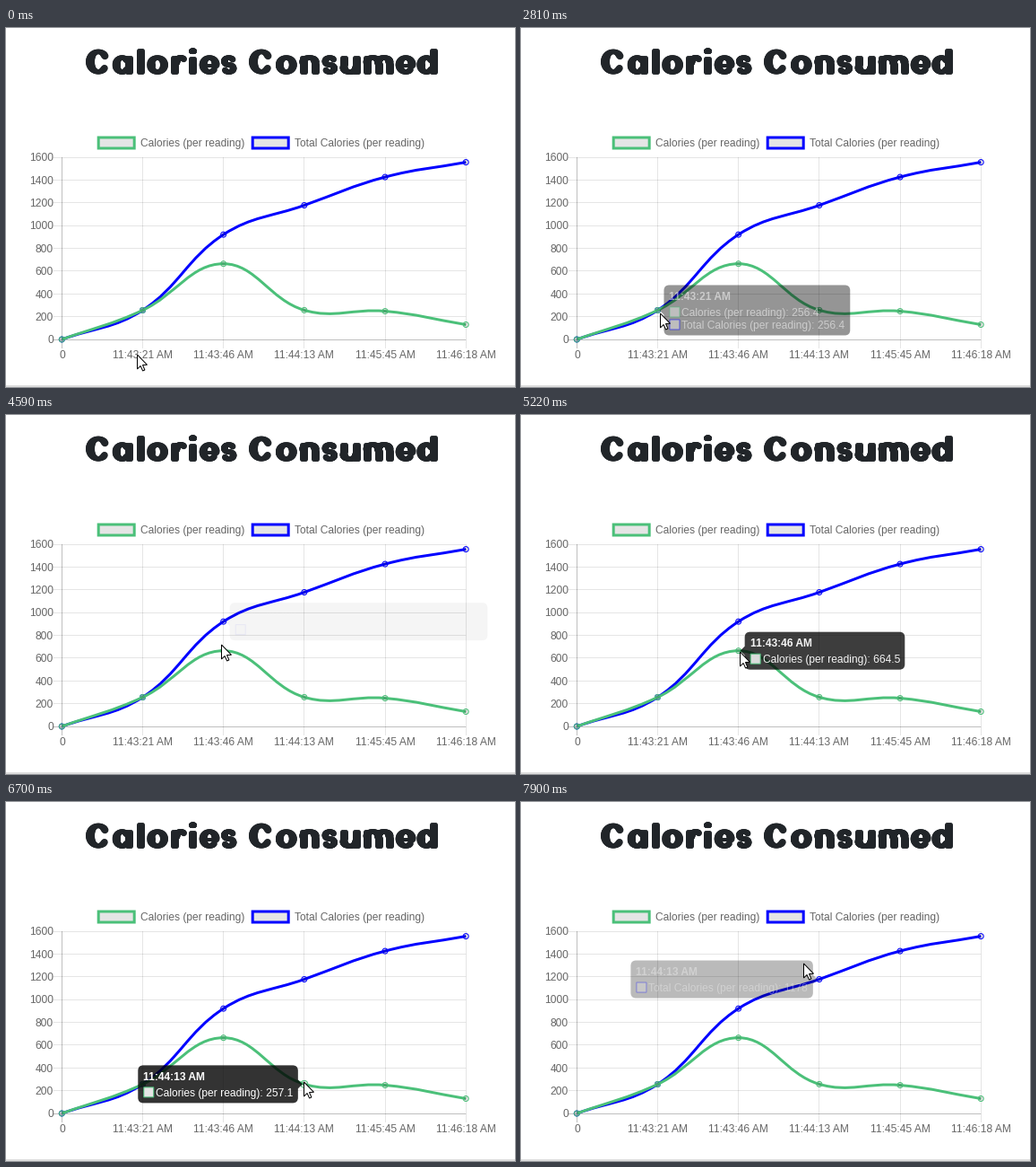
A matplotlib script that plays this animation: 568 by 400 pixels, repeating every 8000 ms.

```python
import numpy as np
import matplotlib.pyplot as plt
from matplotlib.animation import FuncAnimation
from matplotlib.collections import LineCollection
from matplotlib.patches import Circle, PathPatch, Polygon, Rectangle
from matplotlib.path import Path
from matplotlib.textpath import TextPath

W, H, DPI = 568, 400, 100
LOOP, STEP = 8000, 40
PX = 72 / DPI
INK, GRAY, GREEN, BLUE = "#212529", "#666666", "#4bc079", "#0000ff"

plt.rcParams["font.family"] = "Liberation Sans"
plt.rcParams["font.size"] = 12 * PX

fig = plt.figure(figsize=(W / DPI, H / DPI), dpi=DPI, facecolor="white")
ax = fig.add_axes([0, 0, 1, 1])
ax.set_xlim(0, W)
ax.set_ylim(H, 0)
ax.axis("off")


def label(x, y, s, **kw):
    """Text whose capitals are centred on y."""
    return ax.text(x, y + 4.3, s, va="baseline", **kw)


# ---- heading: letters built from pen arcs and stems, y up from the baseline
XH, ASC, THICK, THIN = 21.5, 29, 9, 5.5


def line(x0, y0, x1, y1, w):
    return [np.array([(x0, y0, w), (x1, y1, w)])]


def arc(cx, a0, a1, rx=7.5, cy=XH / 2, ry=8, thick=THICK):
    """Elliptic stroke, heavy at the sides and light at top and bottom."""
    a = np.radians(np.linspace(a0, a1, 30))
    w = THIN + (thick - THIN) * np.cos(a) ** 2
    return [np.column_stack([cx + rx * np.cos(a), cy + ry * np.sin(a), w])]


def stem(x, top=XH, bottom=0):
    """Upright bar with slightly rounded corners."""
    return sum((line(x + dx, bottom + 2.5, x + dx, top - 2.5, 5)
                for dx in (-2, 0, 2)), [])


def arch(x, w):
    return arc(x + w / 2, 180, 0, w / 2, 13.5, 5.2) + stem(x + w, 14)


def bowl():
    return arc(11, 40, 320, 6.5)


GLYPHS = {  # advance, strokes
    "C": (29, arc(14, 35, 320, 9, 14.2, 11.2, 10)),
    "a": (25, bowl() + stem(18.5)),
    "l": (12, stem(5.5, ASC)),
    "o": (25, arc(12.2, 0, 360)),
    "r": (20, stem(5.5) + arc(12.5, 180, 45, 5, 13.5, 5.2)),
    "i": (12, stem(5.5, XH - 1) + arc(5.5, 0, 360, 1.5, 26, 0.5, 6)),
    "e": (23, arc(11.5, 0, 318, 7) + line(7, 9.5, 18, 9.5, 4)),
    "s": (19.5, arc(9.5, 30, 270, 5, 14.7, 4, 7.5)
          + arc(9.5, 90, -150, 5, 6.8, 4, 7.5)),
    "n": (25, stem(5.5) + arch(5.5, 13.5)),
    "u": (25, stem(5.5, XH, 8) + arc(12, 180, 360, 7, 8, 5.2) + stem(19)),
    "m": (36.5, stem(5.5) + arch(5.5, 12.5) + arch(18, 12.5)),
    "d": (24.5, bowl() + stem(18.5, ASC)),
}


def heading(word, x, base, tracking=0.6):
    segs, widths = [], []
    for ch in word:
        advance, strokes = GLYPHS[ch]
        for s in strokes:
            xy = np.column_stack([x + s[:, 0], base - s[:, 1]])
            segs += [xy[i:i + 2] for i in range(len(xy) - 1)]
            widths += list((s[1:, 2] + s[:-1, 2]) / 2 * PX)
        x += advance + tracking
    ax.add_collection(LineCollection(segs, linewidths=widths, colors=INK,
                                     capstyle="round"))


heading("Calories", 89, 51.8)
heading("Consumed", 271, 51.8)
ax.add_patch(Rectangle((0, 398), W, 2, color="#dedede", lw=0))

# ---- chart
X = np.linspace(62.3, 513.2, 6)
TOP, ZERO = 144, 347
READINGS = np.array([0, 256.4, 664.5, 257.1, 248, 130])
TIMES = ["0", "11:43:21 AM", "11:43:46 AM", "11:44:13 AM",
         "11:45:45 AM", "11:46:18 AM"]


def ypix(v):
    return ZERO - np.asarray(v) * (ZERO - TOP) / 1600


def rule(x0, y0, x1, y1, strong):
    ax.plot([x0, x1], [y0, y1], color="black", alpha=0.25 if strong else 0.1,
            lw=PX, zorder=1, solid_capstyle="butt", snap=False)


for x, name in zip(X, TIMES):
    gx = np.floor(x) + 0.5
    rule(gx, TOP, gx, ZERO + 10, name == "0")
    label(gx + 0.4, 364, name, ha="center", color=GRAY)
for v in range(0, 1601, 200):
    gy = np.floor(ypix(v)) + 0.5
    rule(52.5, gy, X[-1], gy, v == 0)
    label(53, ypix(v), str(v), ha="right", color=GRAY)


def smooth_path(x, y, tension=0.4):
    p = np.column_stack([x, y])
    ctrl = []
    for i, c in enumerate(p):
        a, b = p[max(i - 1, 0)], p[min(i + 1, len(p) - 1)]
        d0, d1 = np.hypot(*(c - a)), np.hypot(*(b - c))
        k = tension / (d0 + d1) * (b - a)
        pair = [c - d0 * k, c + d1 * k]
        ctrl.append([(h[0], np.clip(h[1], TOP, ZERO)) for h in pair])
    verts, codes = [p[0]], [Path.MOVETO]
    for i in range(1, len(p)):
        verts += [ctrl[i - 1][1], ctrl[i][0], p[i]]
        codes += [Path.CURVE4] * 3
    return Path(verts, codes)


NAMES = ["Calories (per reading)", "Total Calories (per reading)"]
COLORS = [GREEN, BLUE]
YS = [ypix(READINGS), ypix(np.cumsum(READINGS))]
dots = [[], []]
for d in (1, 0):
    z, left = 4 - d, 103.2 + 172 * d
    ax.add_patch(PathPatch(smooth_path(X, YS[d]), fc="none", ec=COLORS[d],
                           lw=3 * PX, zorder=z))
    for x, y in zip(X, YS[d]):
        c = Circle((x, y), 3, fc=(0, 0, 0, 0.1), ec=COLORS[d], lw=PX,
                   zorder=z + 0.5)
        dots[d].append(ax.add_patch(c))
    ax.add_patch(Rectangle((left, 122), 40, 12, fc="#e5e5e5", ec=COLORS[d],
                           lw=3 * PX, joinstyle="miter", snap=False))
    label(left + 46.4, 127.5, NAMES[d], color=GRAY)

# ---- tooltip
FADE = 400
# (on, off, point, {series: value}, side)
HOVERS = [
    (1964, 2750, 1, {0: "256.4", 1: "256.4"}, 1),
    (3475, 4344, 2, {1: "920.9000000000001"}, 1),
    (4600, 5215, 2, {0: "664.5"}, 1),
    (6290, 6800, 3, {0: "257.1"}, -1),
    (7223, 7805, 3, {1: "1178"}, -1),
]


def ease(u):
    return 1 - (1 - np.clip(u, 0, 1)) ** 4


def row_text(d, value):
    return f"{NAMES[d]}: {value}"


def settled_box(hover):
    """Left, top, width and height of the tooltip at rest."""
    _, _, i, rows, side = hover
    w = 27 + max(TextPath((0, 0), row_text(*r), size=12).get_extents().width
                 for r in rows.items())
    h = 28 + 14 * len(rows)
    left = X[i] + 7 if side > 0 else X[i] - 7 - w
    return np.array([left, YS[min(rows)][i] - h / 2, w, h])


BOXES = [settled_box(h) for h in HOVERS]


def bubble(box, side, r=6):
    x, y, w, h = box
    b, e, m = y + h, x + w, y + h / 2
    M, L, Q = Path.MOVETO, Path.LINETO, Path.CURVE3
    steps = [(M, x + r, y), (L, e - r, y), (Q, e, y), (Q, e, y + r)]
    if side < 0:
        steps += [(L, e, m - 5), (L, e + 5, m), (L, e, m + 5)]
    steps += [(L, e, b - r), (Q, e, b), (Q, e - r, b), (L, x + r, b),
              (Q, x, b), (Q, x, b - r)]
    if side > 0:
        steps += [(L, x, m + 5), (L, x - 5, m), (L, x, m - 5)]
    steps += [(L, x, y + r), (Q, x, y), (Q, x + r, y)]
    return Path([s[1:] for s in steps], [s[0] for s in steps])


tip = ax.add_patch(PathPatch(bubble(BOXES[0], 1), fc="black", lw=0, zorder=6))
tip_title = label(0, 0, "", color="white", weight="bold", zorder=7)
tip_keys = [ax.add_patch(Rectangle((0, 0), 11, 11, fc="#e5e5e5", lw=PX,
                                   snap=False, zorder=7)) for _ in range(2)]
tip_rows = [label(0, 0, "", color="white", zorder=7) for _ in range(2)]


def draw_tip(t):
    for c in dots[0] + dots[1]:
        c.set_radius(3)
    for a in [tip, tip_title] + tip_keys + tip_rows:
        a.set_visible(False)
    n = sum(h[0] <= t for h in HOVERS) - 1
    if n < 0:
        return
    on, off, i, rows, side = HOVERS[n]
    p = ease((t - on) / FADE)
    alpha = p if t < off else 1 - ease((t - off) / FADE)
    if alpha < 0.005:
        return
    start = BOXES[max(n - 1, 0)]
    box = start + (BOXES[n] - start) * p
    x, y = box[:2]
    tip.set_path(bubble(box, side))
    tip.set_alpha(0.8 * alpha)
    tip_title.set_text(TIMES[i])
    tip_title.set_position((x + 6, y + 16.3))
    shown = [tip, tip_title]
    for k, (d, value) in enumerate(rows.items()):
        dots[d][i].set_radius(4 if t < off else 3)
        cy = y + 30 + 14 * k
        tip_keys[k].set_xy((x + 6.5, cy - 5.5))
        tip_keys[k].set_edgecolor(COLORS[d])
        tip_rows[k].set_text(row_text(d, value))
        tip_rows[k].set_position((x + 20, cy + 4.3))
        shown += [tip_keys[k], tip_rows[k]]
    for a in shown:
        a.set_visible(True)
        if a is not tip:
            a.set_alpha(alpha)


# ---- pointer
ARROW = np.array([(0.5, 1), (0.5, 17), (4.1, 13.5), (6.6, 19),
                  (8.9, 18), (6.5, 12.5), (11.5, 12.3)])
arrow = ax.add_patch(Polygon(ARROW, fc="white", ec="black", lw=PX, zorder=9,
                             joinstyle="miter"))
HOME = np.array([146, 363])
# (begin, end, x, y, sideways bow)
GLIDES = [(100, 270, 143, 360, 0), (600, 1950, 154, 318, -6),
          (2750, 3600, 247, 229, 0), (3800, 4550, 240, 255, 0),
          (4600, 5000, 242, 262, -3), (5150, 6000, 329, 314, 10),
          (6650, 7230, 332, 198, 28), (7600, 7900, 315, 179, 0)]


def pointer(t):
    pos = HOME
    for begin, end, x, y, bow in GLIDES:
        u = np.clip((t - begin) / (end - begin), 0, 1)
        s = u * u * (3 - 2 * u)
        pos = pos + (np.array([x, y]) - pos) * s + [bow * np.sin(np.pi * s), 0]
    return np.round(pos)


# The picture only changes at these moments and holds in between.
RUNS = [(0, 0, 1), (120, 270, 2), (700, 1720, 9), (1840, 2260, 4),
        (2810, 3740, 8), (3890, 3890, 1), (4170, 5070, 8), (5220, 6010, 6),
        (6310, 7240, 8), (7390, 7900, 5)]
MOMENTS = np.concatenate([np.linspace(*r) for r in RUNS])


def update(frame):
    now = (frame + 1) * STEP - 1
    t = MOMENTS[np.searchsorted(MOMENTS, now, side="right") - 1]
    arrow.set_xy(ARROW + pointer(t))
    draw_tip(t)
    return []


anim = FuncAnimation(fig, update, frames=LOOP // STEP, interval=STEP,
                     init_func=lambda: [], repeat=True, repeat_delay=0)
plt.show()
```
